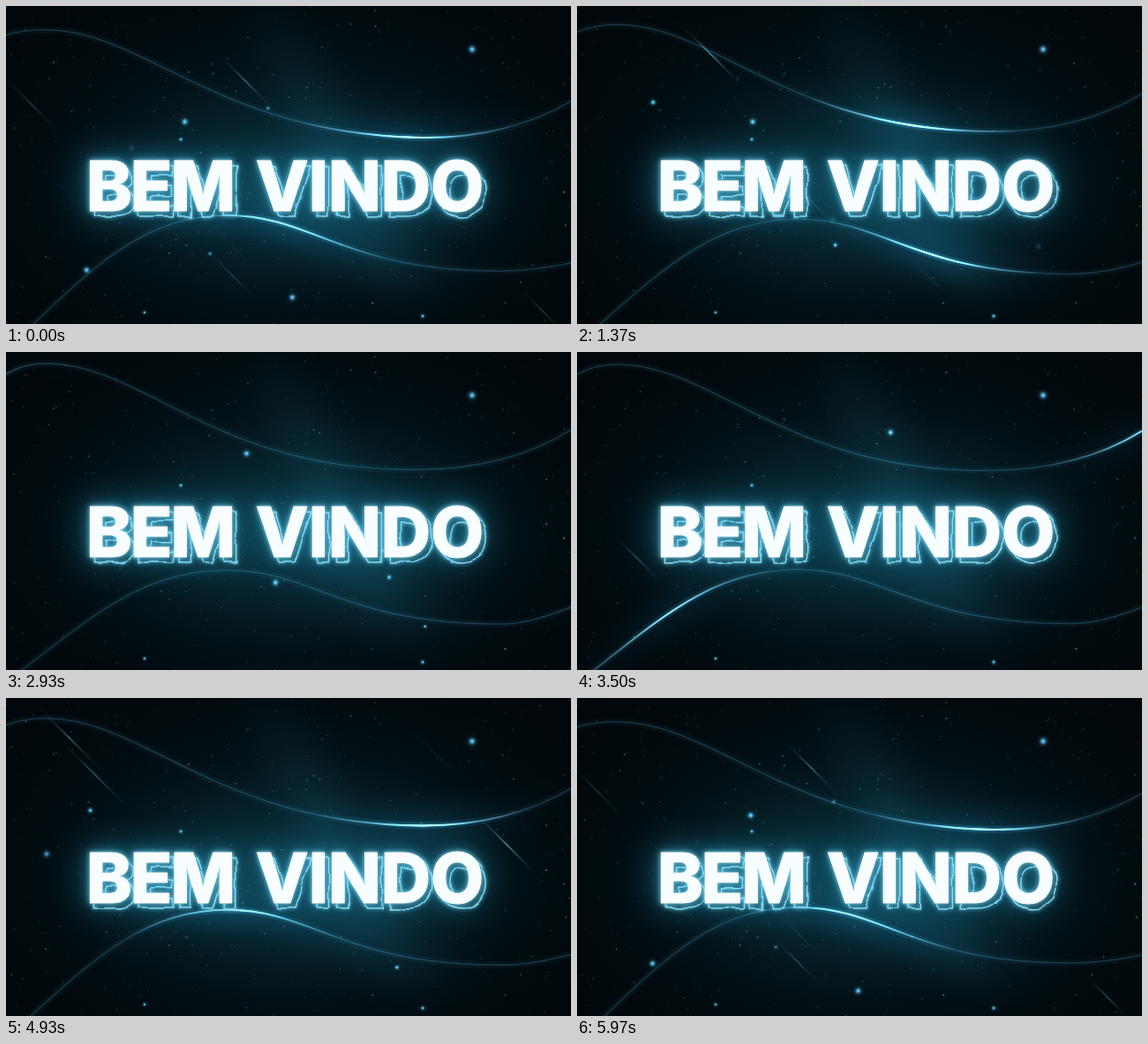
An HTML page with a canvas that plays this animation: 640 px wide and 360 px high, repeating every 6.01 s.

```html
<!DOCTYPE html>
<html lang="pt">
<head>
<meta charset="utf-8">
<title>Bem vindo</title>
<style>
  html, body { margin: 0; width: 100%; height: 100%; overflow: hidden; background: #01070a; }
  canvas, svg { position: absolute; left: 0; top: 0; width: 640px; height: 360px; }
  text { font: 800 78px Inter, "Open Sans", sans-serif; text-anchor: middle; }
  .far { fill: #17677f; stroke: #17677f; stroke-width: 8; filter: blur(19px); opacity: .85; }
  .mid { fill: #2f8fb0; stroke: #2f8fb0; stroke-width: 3; filter: blur(7px); opacity: .7; }
  .near { fill: #8fdcf5; stroke: #8fdcf5; stroke-width: 2; filter: blur(2.5px); opacity: .8; }
  .edge { fill: none; stroke: #7fdcf8; stroke-width: 1.5; }
  .face { fill: #f8feff; stroke: #f8feff; stroke-width: 1; }
</style>
</head>
<body>
<canvas id="stage" width="640" height="360"></canvas>
<svg viewBox="0 0 640 360">
  <defs>
    <g id="words"><text x="174.5" y="232" letter-spacing="-2">BEM</text><text x="412" y="232">VINDO</text></g>
    <filter id="wobble" filterUnits="userSpaceOnUse" x="0" y="100" width="640" height="220"
            color-interpolation-filters="sRGB">
      <feTurbulence type="fractalNoise" baseFrequency=".06" numOctaves="1" seed="4"/>
      <feOffset id="drift" result="noise"/>
      <feDisplacementMap in="SourceGraphic" in2="noise" scale="7"
                         xChannelSelector="R" yChannelSelector="G" result="line"/>
      <feGaussianBlur stdDeviation="2"/>
      <feMerge><feMergeNode/><feMergeNode in="line"/></feMerge>
    </filter>
  </defs>
  <use href="#words" class="far"/>
  <use href="#words" class="mid"/>
  <use href="#words" class="near"/>
  <g filter="url(#wobble)"><use href="#words" class="edge" x="5" y="6"/></g>
  <use href="#words" class="face"/>
</svg>
<script>
const W = 640, H = 360, LOOP = 6.01, TAU = Math.PI * 2;
const ctx = document.getElementById('stage').getContext('2d');
const drift = document.getElementById('drift');

let seed = 11;
const rand = (lo = 0, hi = 1) => {
  seed = seed * 16807 % 2147483647;
  return lo + (hi - lo) * seed / 2147483647;
};
const many = (n, make) => Array.from({ length: n }, make);

const wrap = (t) => ((t % LOOP) + LOOP) % LOOP;
const since = (t, t0) => wrap(t - t0 + LOOP / 2) - LOOP / 2;
const fade = (age, life) => Math.max(0, Math.min(1, (life - Math.abs(age)) / .3));

const stars = many(520, () => ({
  x: rand(0, W), y: rand(0, H), r: .45 + rand() ** 4 * .6,
  a: rand(.15, .6), phase: rand(0, TAU), rate: Math.ceil(rand(0, 3)),
}));

const stills = [[528, 49, 4.4], [472, 351, 2.4], [157, 347, 2], [198, 151, 2.2]]
  .map(([x, y, r]) => ({ x, y, r }));

// Dots are placed where they are halfway through their life
const leaders = [[3.5, 355, 91], [1.35, 196, 132], [5.8, 172, 140], [.33, 139, 285], [.33, 372, 316], [2.48, 240, 280]]
  .map(([t0, x, y]) => ({ t0, x, y, r: 3.8, life: 1.1 }));
const dots = leaders.concat(many(14, () => ({
  t0: rand(0, LOOP), x: rand(0, 480), y: rand(80, 340), r: rand(2, 3.4), life: .7,
})));

const streaks = many(24, () => ({
  t0: rand(0, LOOP), x: rand(60, 580), y: rand(50, 310), half: rand(18, 36), a: rand(.3, .8),
}));

function glow(c, x, y, rx, ry, rgb, alpha, turn = 0) {
  c.save();
  c.translate(x, y);
  c.rotate(turn);
  c.scale(rx, ry);
  const g = c.createRadialGradient(0, 0, 0, 0, 0, 1);
  [1, .72, .36, .1, 0].forEach((s, i) => g.addColorStop(i / 4, `rgba(${rgb},${alpha * s})`));
  c.fillStyle = g;
  c.fillRect(-1, -1, 2, 2);
  c.restore();
}

const sky = document.createElement('canvas');
sky.width = W;
sky.height = H;
{
  const c = sky.getContext('2d');
  c.fillStyle = '#01070a';
  c.fillRect(0, 0, W, H);
  glow(c, 325, 200, 420, 270, '8,46,58', .75);
  glow(c, 330, 205, 310, 135, '16,76,96', .5);
  glow(c, 370, 160, 260, 70, '22,80,98', .28, 1.1);
  glow(c, 400, 260, 170, 70, '18,80,104', .3, .4);
}

function dot({ x, y, r }, a) {
  glow(ctx, x, y, r * 2, r * 2, '60,145,185', a * .6);
  glow(ctx, x, y, r * 1.2, r * 1.2, '100,185,220', a);
}

// Line colour that fades out at both ends
function beam(x0, y0, x1, y1, rgb, a) {
  const g = ctx.createLinearGradient(x0, y0, x1, y1);
  [0, .3, 1, .3, 0].forEach((s, i) => g.addColorStop(i / 4, `rgba(${rgb},${a * s})`));
  return g;
}

function stroke(path, width, style, blur = 0) {
  ctx.filter = blur ? `blur(${blur}px)` : 'none';
  ctx.lineWidth = width;
  ctx.strokeStyle = style;
  ctx.stroke(path);
  ctx.filter = 'none';
}

// s swings between -1 and 1 and lifts each key point by its own amount
const upper = (s) => `M0 ${29 + 4 * s}
  C15 ${22 + 6 * s} 30 ${20 + 7 * s} 45 ${20 + 7 * s}
  C158 ${20 + 7 * s} 238 ${141 + 4 * s} 470 ${141 + 8 * s}
  C545 ${141 + 9 * s} 600 ${122 + 9 * s} 640 ${98 + 10 * s}`;
const lower = (s) => `M0 ${382 + 8 * s}
  C90 ${305 - s} 150 ${242 - 5 * s} 250 ${242 - 5 * s}
  C350 ${242 - 5 * s} 380 ${304 - 4 * s} 560 ${304 - 4 * s}
  C590 ${304 - 4 * s} 615 ${297 - s} 640 ${290 + s}`;

function ribbon(shape, x, strength) {
  const path = new Path2D(shape);
  const light = (half, rgb, a) => beam(x - half, 0, x + half, 0, rgb, a * strength);
  stroke(path, 8, 'rgba(40,115,145,.07)');
  stroke(path, 1.5, 'rgba(62,135,165,.27)');
  stroke(path, 36, light(160, '24,100,140', .22), 12);
  stroke(path, 5, light(120, '50,145,185', .4), 1.5);
  stroke(path, 2, light(120, '190,240,255', .95));
}

function draw(t) {
  const turn = TAU * t / LOOP, swing = Math.cos(turn);
  ctx.drawImage(sky, 0, 0);
  for (const { x, y, r, a, phase, rate } of stars) {
    ctx.fillStyle = `rgba(110,175,195,${a * (.7 + .3 * Math.cos(turn * rate + phase))})`;
    ctx.fillRect(x - r, y - r, 2 * r, 2 * r);
  }
  ctx.globalCompositeOperation = 'lighter';

  // Lights rush in, linger near the middle and rush out
  const u = wrap(t - 3) / LOOP, v = u - .46;
  const strength = Math.min(1, u * 8, (1 - u) * 8);
  ribbon(upper(swing), 458 - 60 * v - 3100 * v ** 3, strength);
  ribbon(lower(swing), 300 + 250 * v + 1850 * v ** 3, strength);

  for (const { t0, x, y, half, a } of streaks) {
    const age = since(t, t0), alpha = a * fade(age, .45);
    if (!alpha) continue;
    const cx = x + 170 * age, cy = y + 170 * age;
    const ends = [cx - half, cy - half, cx + half, cy + half];
    const path = new Path2D(`M${ends[0]} ${ends[1]}L${ends[2]} ${ends[3]}`);
    stroke(path, 1.6, beam(...ends, '95,185,215', alpha));
  }
  for (const d of stills) dot(d, .8);
  for (const { t0, x, y, r, life } of dots) {
    const age = since(t, t0), alpha = fade(age, life);
    if (alpha) dot({ x: x + 145 * age, y: y - 42 * age, r }, alpha * .8);
  }
  ctx.globalCompositeOperation = 'source-over';

  drift.setAttribute('dx', 40 * Math.cos(turn));
  drift.setAttribute('dy', 40 * Math.sin(turn));
}

function tick() {
  draw(performance.now() / 1000 % LOOP);
  requestAnimationFrame(tick);
}
tick();
</script>
</body>
</html>
```
